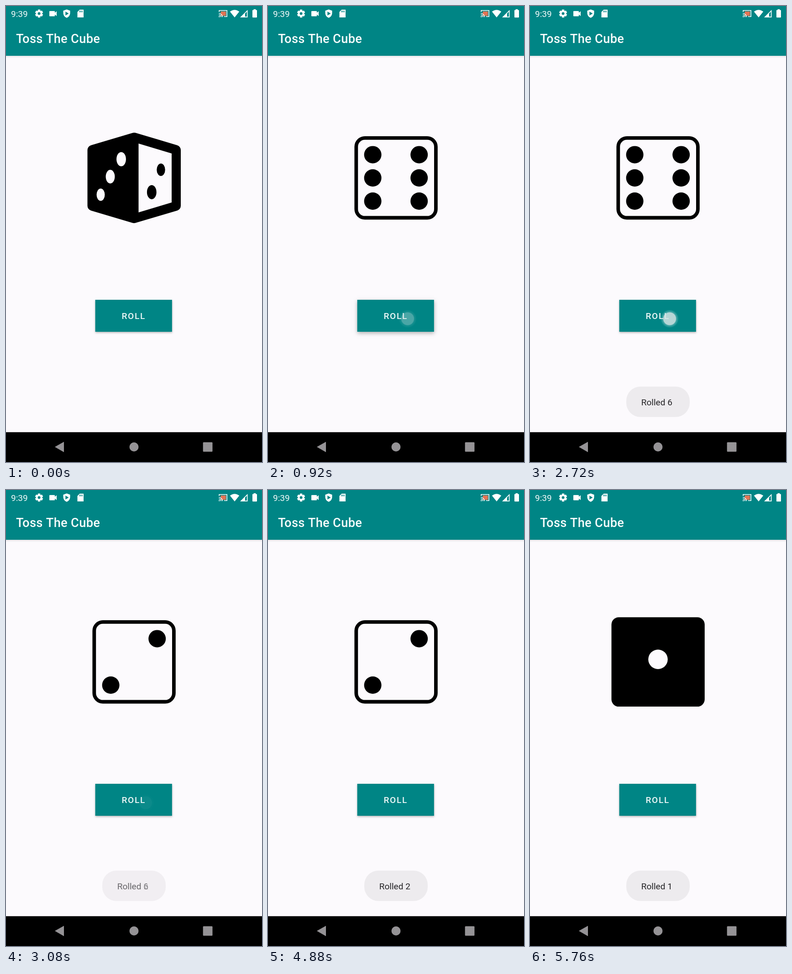
Recreate the animation shown at these times as an HTML page with a canvas. Size 561x998 px, loop 5.8 s.

```html
<!DOCTYPE html>
<html lang="en">
<head>
<meta charset="utf-8">
<title>Dice roller</title>
<style>
  html, body { margin: 0; width: 100%; height: 100%; overflow: hidden; background: #fcfafd; }
  canvas { display: block; width: 561px; height: 998px; }
</style>
</head>
<body>
<canvas id="stage" width="561" height="998"></canvas>
<script>
const ctx = document.getElementById('stage').getContext('2d');
const LOOP = 5800;
const TEAL = '#008585', PAPER = '#fcfafd', INK = '#000', WHITE = '#fff';

const TAPS = [
  { down: 680, up: 800, shown: 840, value: 6 },
  { down: 2720, up: 2910, shown: 2920, value: 2 },
  { down: 5040, up: 5160, shown: 5160, value: 1 }
];
const TOASTS = [
  { from: 960, to: 2960, value: 6 },
  { from: 3000, to: 5040, value: 2 },
  { from: 5220, to: Infinity, value: 1 }
];
const FADE = 400;

const clamp = v => Math.max(0, Math.min(1, v));
const ramp = (t, start, length) => clamp((t - start) / length);

function fill(color, draw) {
  ctx.fillStyle = color;
  ctx.beginPath();
  draw();
  ctx.fill();
}
function poly(color, ...pts) {
  fill(color, () => {
    pts.forEach(([x, y]) => ctx.lineTo(x, y));
    ctx.closePath();
  });
}
const ellipse = (color, x, y, rx, ry = rx) =>
  fill(color, () => ctx.ellipse(x, y, rx, ry, 0, 0, 2 * Math.PI));
const box = (color, x, y, w, h, r = 0) =>
  fill(color, () => ctx.roundRect(x, y, w, h, r));

function label(text, x, y, size, weight, color, spacing = 0) {
  ctx.font = `${weight} ${size}px Roboto, sans-serif`;
  ctx.letterSpacing = spacing + 'px';
  ctx.fillStyle = color;
  ctx.fillText(text, x, y);
}

function gear(x, y) {
  ctx.save();
  ctx.translate(x, y);
  for (let i = 0; i < 6; i++) {
    poly(WHITE, [-2.4, -8.7], [2.4, -8.7], [3.2, -5], [-3.2, -5]);
    ctx.rotate(Math.PI / 3);
  }
  ellipse(WHITE, 0, 0, 6.5);
  ellipse(TEAL, 0, 0, 3);
  ctx.restore();
}

function statusBar() {
  label('9:39', 11, 24, 19, 400, '#f4fbfb');
  gear(72.5, 16.5);

  box(WHITE, 95, 11, 12, 11.5, 1.2);
  poly(WHITE, [106, 15.5], [111, 11.5], [111, 22], [106, 18]);

  fill(WHITE, () => {
    ctx.moveTo(133, 7.5);
    ctx.lineTo(140.5, 10.3);
    ctx.lineTo(140.5, 16);
    ctx.quadraticCurveTo(140, 23, 133, 26);
    ctx.quadraticCurveTo(126, 23, 125.5, 16);
    ctx.lineTo(125.5, 10.3);
  });
  poly(TEAL, [130.3, 12.3], [137.5, 16.5], [130.3, 20.7]);

  poly(WHITE, [161.5, 8], [170, 8], [170, 25], [156.5, 25], [156.5, 13]);
  for (let i = 0; i < 3; i++) box(TEAL, 160.7 + i * 2.8, 10.2, 1.5, 3.6);

  box('#e07455', 470.5, 12, 11.5, 9.5);
  ctx.strokeStyle = WHITE;
  ctx.lineWidth = 1.6;
  ctx.beginPath();
  ctx.moveTo(467.2, 13);
  ctx.lineTo(467.2, 9.8);
  ctx.lineTo(484.2, 9.8);
  ctx.lineTo(484.2, 23.3);
  ctx.lineTo(478, 23.3);
  ctx.stroke();
  for (const r of [4.7, 8]) {
    ctx.beginPath();
    ctx.arc(466.4, 24.2, r, -Math.PI / 2, 0);
    ctx.stroke();
  }
  ellipse(WHITE, 467.4, 23.2, 1.2);

  fill(WHITE, () => {
    ctx.moveTo(501, 25);
    ctx.lineTo(490.8, 12.3);
    ctx.quadraticCurveTo(501, 4.7, 511.2, 12.3);
  });

  poly(WHITE, [529.5, 8.5], [529.5, 25], [513, 25]);
  poly(TEAL, [524, 16.3], [527.8, 12.5], [527.8, 23.3], [524, 23.3]);

  box(WHITE, 542.7, 7, 4.6, 4);
  box(WHITE, 540, 8.8, 10, 16.4, 1.2);
}

function appBar() {
  const shade = ctx.createLinearGradient(0, 109, 0, 114);
  shade.addColorStop(0, 'rgba(0,0,0,.09)');
  shade.addColorStop(1, 'rgba(0,0,0,0)');
  box(shade, 0, 109, 561, 5);
  box(TEAL, 0, 0, 561, 109);
  statusBar();
  label('Toss The Cube', 22, 81, 27.2, 500, '#f7fcfc', 0.34);
}

function navBar() {
  const gray = '#959396';
  box(INK, 0, 932.7, 561, 66);
  poly(gray, [107, 965], [127, 953.7], [127, 976.5]);
  ellipse(gray, 280.5, 965, 10);
  box(gray, 431.7, 954.7, 20.8, 20.8, 1.5);
}

function cube() {
  const pts = [[383, 307], [383, 445.5], [280.5, 475.7], [178.5, 445.5], [178.5, 307], [280.5, 276.7]];
  fill(INK, () => {
    ctx.moveTo(331.7, 291.8);
    pts.forEach(([x, y], i) => ctx.arcTo(x, y, ...pts[(i + 1) % 6], 11));
    ctx.closePath();
  });
  poly(PAPER, [290.5, 301], [363, 322.7], [363, 430], [290.5, 451.7]);
  ellipse(PAPER, 252.5, 335.3, 10.4, 15.5);
  ellipse(PAPER, 228.5, 373.5, 9.9, 14.9);
  ellipse(PAPER, 207.5, 413, 9, 13.5);
  ellipse(INK, 339.5, 358.4, 9.2, 13.7);
  ellipse(INK, 319.3, 407.4, 10.4, 15.5);
}

function face(value) {
  if (value === 1) {
    box(INK, 178.5, 278.5, 204.3, 195.6, 16);
    ellipse(PAPER, 280.5, 370.6, 21.3);
    return;
  }
  ctx.strokeStyle = INK;
  ctx.lineWidth = 7.8;
  ctx.beginPath();
  ctx.roundRect(193.3, 288.9, 174.6, 174.6, 19);
  ctx.stroke();
  const left = 229.6, right = 331.2, rows = [325.4, 376.2, 427];
  const pips = value === 6
    ? rows.flatMap(y => [[left, y], [right, y]])
    : [[right, rows[0]], [left, rows[2]]];
  pips.forEach(([x, y]) => ellipse(INK, x, y, 19));
}

function button(lift) {
  ctx.save();
  ctx.shadowColor = `rgba(0,0,0,${0.28 + 0.04 * lift})`;
  ctx.shadowBlur = 4 + 7 * lift;
  ctx.shadowOffsetY = 1.6 + 2.4 * lift;
  box(TEAL, 195.6, 643, 168.2, 70);
  ctx.restore();
  label('ROLL', 253.5, 685.3, 19.06, 500, '#eef8f8', 1.7);
}

function pointer(alpha) {
  if (!alpha) return;
  const x = 306, y = 684.5;
  ctx.save();
  ctx.globalAlpha = alpha;
  const glow = ctx.createRadialGradient(x, y, 13, x, y, 20);
  glow.addColorStop(0, 'rgba(190,225,225,.5)');
  glow.addColorStop(1, 'rgba(190,225,225,0)');
  ellipse(glow, x, y, 20);
  ellipse('rgba(220,230,230,.7)', x, y, 14);
  ctx.restore();
}

function toast({ from, to, value }, t) {
  const alpha = ramp(t, from, FADE) * (1 - ramp(t, to, FADE));
  if (!alpha) return;
  ctx.save();
  ctx.globalAlpha = alpha;
  box('#edebee', 211, 833, 139, 66.5, 31);
  label('Rolled ' + value, 243.7, 874, 19.06, 400, '#242326');
  ctx.restore();
}

function draw(t) {
  let lift = 0, touch = 0, value = 0;
  for (const tap of TAPS) {
    if (t >= tap.shown) value = tap.value;
    if (t >= tap.down) {
      touch = 1 - ramp(t, tap.up, 180);
      lift = ramp(t, tap.down + 20, 100) * (1 - ramp(t, tap.up + 100, 60));
    }
  }
  box(PAPER, 0, 0, 561, 998);
  appBar();
  value ? face(value) : cube();
  button(lift);
  TOASTS.forEach(item => toast(item, t));
  navBar();
  pointer(touch);
}

const start = performance.now();
function tick() {
  draw((performance.now() - start) % LOOP);
  requestAnimationFrame(tick);
}
tick();
</script>
</body>
</html>
```
